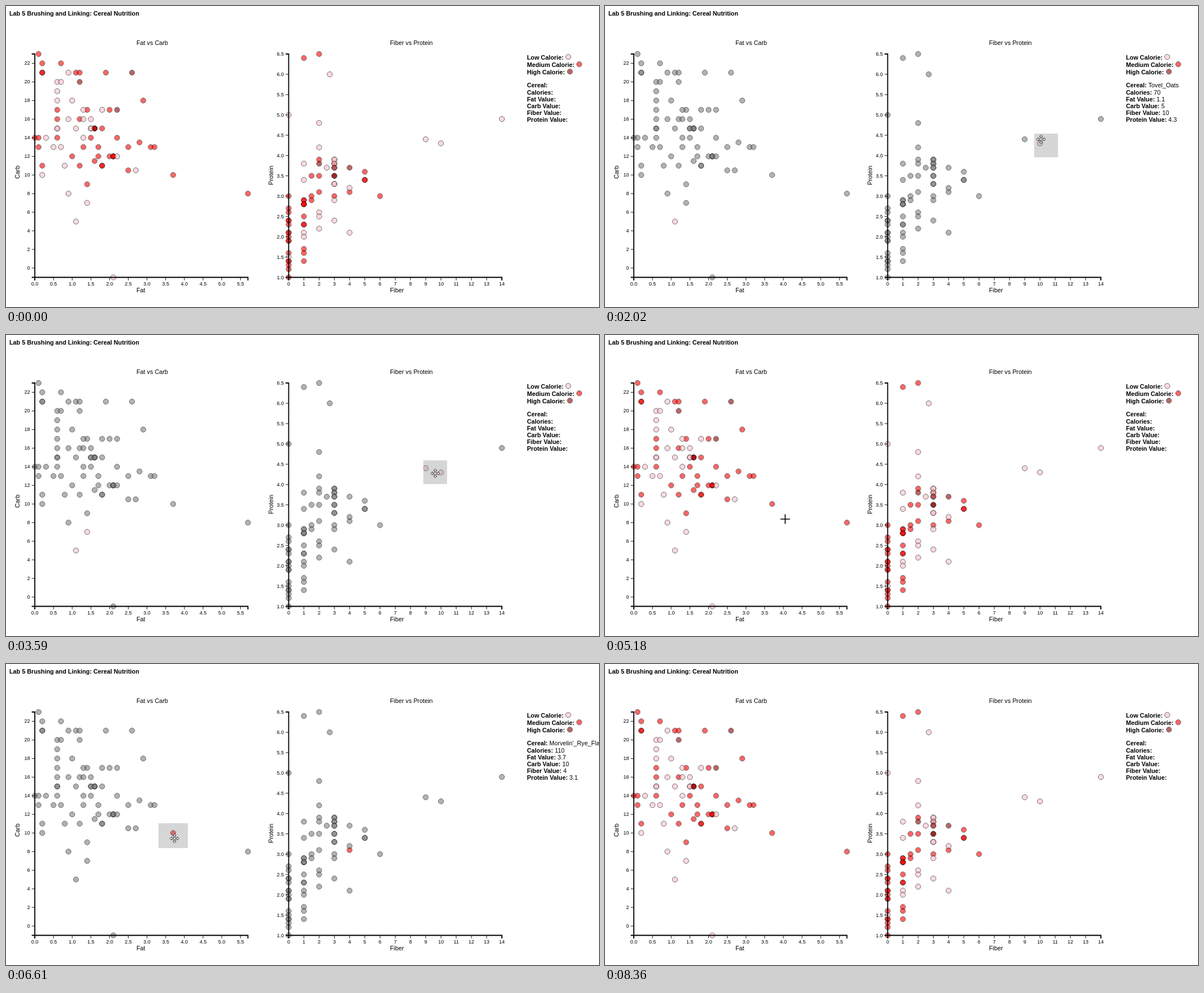
These frames come from a looping animation (1050x533 px, 8.88 s). An HTML page:

```html
<!DOCTYPE html>
<html>
<head>
<meta charset="utf-8">
<style>
html, body { margin: 0; width: 100%; height: 100%; overflow: hidden; background: #fff; }
svg { display: block; font: 10.8px "Liberation Sans", Arial, sans-serif; }
.b { font-weight: bold; }
.tick { font-size: 9px; }
.dot { opacity: .6; stroke: #000; stroke-width: .95; }
.axis { fill: none; stroke: #000; stroke-width: 1.8; }
.marks { fill: none; stroke: #000; stroke-width: .9; }
#brush { fill: #777; fill-opacity: .3; stroke: #fff; shape-rendering: crispEdges; }
</style>
</head>
<body>
<svg id="stage" width="1050" height="533" viewBox="0 0 1050 533"></svg>
<script>
const LOOP = 8880, TOP = 85, BOTTOM = 480.5;
const COLORS = { medium: 'red', low: 'pink', high: 'darkred' };

const plots = [
  { left: 51, right: 428.4, xMax: 5.7, yMin: -1, yMax: 23, xStep: .5, yFrom: 0, yStep: 2, xDigits: 1, yDigits: 0,
    title: 'Fat vs Carb', xName: 'Fat', yName: 'Carb', textX: 231, nameX: 23.5, nameY: 306 },
  { left: 500.5, right: 878, xMax: 14, yMin: 1, yMax: 6.5, xStep: 1, yFrom: 1, yStep: .5, xDigits: 0, yDigits: 1,
    title: 'Fiber vs Protein', xName: 'Fiber', yName: 'Protein', textX: 680, nameX: 473, nameY: 317 }
];

// Carb: fat values
const fatCarb = {
  medium: '23:.1 22:.2,.7 21:.2,.2,1.1,1.2,1.9 18:2.9 17:.6,1.4,2 16:.6,1.2 15:1.6,1.6,1.8 14:0,.1,.6,1.5,2.2 ' +
    '13.5:2.8 13:.1,1.3,1.7,2.5,3.1,3.2 12:1,1.7,2,2.1,2.1,2.1 11.5:1.6 11:.2,1.2,1.8,1.8 10.5:2.5 10:3.7 9:1.4 8:5.7',
  low: '21:.9 20:.6,.7 19:.6 18:.6,1 17:1.3,1.8 16:.9,1.3,1.5 15:.6,.6,1.1,1.5,1.5 14:.3,1.3 13:.5,.7 ' +
    '12:2.2 11:.8 10.5:2.7 10:.2 8:.9 7:1.4 5:1.1 -1:2.1',
  high: '21:2.6 20:1.2 17:2.2 15:1.6'
};
// Fiber: protein values
const fiberProtein = {
  medium: '0:3,2.7,2.6,2.4,2.4,2.3,2.1,2.1,2,1.9,1.9,1.6,1.4,1.4,1.3,1.2,1 ' +
    '1:6.4,2.9,2.9,2.8,2.8,2.8,2.5,2.3,2.3,1.7,1.6,1.4 1.5:3.5,3,2.9 2:6.5,3.9,3.5,3.1 3:3.8,3 4:3.1 5:3.6,3.4,3.4 6:3',
  low: '0:5,1.5 1:3.8,3.4,2.1,2 2:4.8,4.2,2.6,2.5,2.2 2.5:3.7 2.7:6 3:3.9,3.9,3.8,3.7,3.3,3.3,2.9,2.4 ' +
    '4:3.2,2.1 9:4.4 10:4.3 14:4.9',
  high: '2:3.8 3:3.7,3.5,3.5 4:3.7'
};
// fat, carb, fiber, protein of the cereals that get brushed
const links = [[1.1, 5, 10, 4.3], [1.4, 7, 9, 4.4], [3.7, 10, 4, 3.1], [2.7, 10.5, 2.5, 3.7], [2.5, 10.5, 2, 3.5]];

const labels = ['Cereal', 'Calories', 'Fat Value', 'Carb Value', 'Fiber Value', 'Protein Value'];
const details = [
  { from: 1880, to: 3590, values: ['Tovel_Oats', 70, 1.1, 5, 10, 4.3] },
  { from: 6050, to: 7550, values: ["Morvelin'_Rye_Flak", 110, 3.7, 10, 4, 3.1] }
];

// time, x, y
const path = [
  [110, 976, 522], [880, 800, 269], [1150, 802, 268], [1650, 759, 225], [2020, 772, 236], [2080, 772, 236],
  [2300, 785, 247], [2500, 781, 249], [2890, 781, 249], [3390, 760, 245], [3860, 760, 245], [4200, 700, 290],
  [4720, 520, 325], [5120, 319, 326], [5190, 319, 326], [5250, 323, 327], [5650, 270, 282], [5720, 270, 282],
  [6540, 298.5, 309], [6610, 298.5, 309], [7080, 245.5, 296], [7140, 245.5, 296], [7350, 228, 292],
  [7490, 228, 292], [7950, 306, 380], [8150, 306, 380], [8360, 839, 512]
];
const brushes = [
  { start: 1150, drawn: 1650, grab: 2890, drop: 3390, end: 4200 },
  { start: 5250, drawn: 5650, grab: 6610, drop: 7350, end: 7700 }
];

const px = (p, v) => p.left + v / p.xMax * (p.right - p.left);
const py = (p, v) => BOTTOM - (v - p.yMin) / (p.yMax - p.yMin) * (BOTTOM - TOP);
const text = (x, y, s, attrs = '') => `<text x="${x}" y="${y}" ${attrs}>${s}</text>`;
const circle = (x, y, color) => `<circle class="dot" cx="${x}" cy="${y}" r="4.6" fill="${color}"/>`;

function readDots(data, plot, keyIsX) {
  return Object.keys(data).flatMap(level => data[level].split(' ').flatMap(row => {
    const [key, list] = row.split(':');
    return list.split(',').map(v => {
      const [a, b] = keyIsX ? [+key, +v] : [+v, +key];
      return { a, b, x: px(plot, a), y: py(plot, b), color: COLORS[level] };
    });
  }));
}

function drawAxes(p) {
  let marks = '', out = '';
  for (let v = 0; v <= p.xMax; v += p.xStep) {
    const x = px(p, v);
    marks += `M${x} ${BOTTOM}v5.4`;
    out += text(x, 495, v.toFixed(p.xDigits), 'class="tick" text-anchor="middle"');
  }
  for (let v = p.yFrom; v <= p.yMax; v += p.yStep) {
    const y = py(p, v);
    marks += `M${p.left} ${y}h-5.4`;
    out += text(p.left - 8.5, y + 3, v.toFixed(p.yDigits), 'class="tick" text-anchor="end"');
  }
  return out + `<path class="marks" d="${marks}"/>` +
    `<path class="axis" d="M${p.left - 5.4} ${TOP}h5.4V${BOTTOM}h-5.4M${p.left} ${BOTTOM + 5.4}v-5.4H${p.right}v5.4"/>` +
    text(p.textX, 69, p.title) + text(p.textX, 507, p.xName) +
    text(0, 0, p.yName, `transform="translate(${p.nameX} ${p.nameY}) rotate(-90)"`);
}

const left = readDots(fatCarb, plots[0], false);
const right = readDots(fiberProtein, plots[1], true);
const dots = [...left, ...right];
for (const [fat, carb, fiber, protein] of links) {
  const l = left.find(d => d.a === fat && d.b === carb);
  const r = right.find(d => d.a === fiber && d.b === protein);
  l.mate = r;
  r.mate = l;
}

const stage = document.getElementById('stage');
stage.innerHTML =
  text(6, 17, 'Lab 5 Brushing and Linking: Cereal Nutrition', 'class="b"') +
  `<g id="dots">${dots.map(d => circle(d.x, d.y, d.color)).join('')}</g>` +
  plots.map(drawAxes).join('') +
  [['Low', 995.5, 'low'], ['Medium', 1015, 'medium'], ['High', 998.5, 'high']].map(([name, x, level], i) =>
    text(922.5, 95.3 + 13 * i, name + ' Calorie:', 'class="b"') + circle(x, 90.2 + 13 * i, COLORS[level])).join('') +
  labels.map((s, i) => text(922.5, 144.3 + 12.2 * i,
    `<tspan class="b">${s}:</tspan> <tspan class="value"></tspan>`)).join('') +
  '<rect id="brush"/><path id="cursor"/>';

const circles = document.getElementById('dots').children;
const values = stage.querySelectorAll('.value');
const brushBox = document.getElementById('brush');
const cursor = document.getElementById('cursor');
const setAttrs = (el, attrs) => { for (const k in attrs) el.setAttribute(k, attrs[k]); };

const shapes = {
  cross: { d: 'M-8.5 0H8.5M0-8.5V8.5', fill: 'none', stroke: '#000', 'stroke-width': 1.6 },
  move: { d: 'M0-8L3-5H1V-1H5V-3L8 0 5 3V1H1V5H3L0 8-3 5H-1V1H-5V3L-8 0-5-3V-1H-1V-5H-3Z',
    fill: '#fff', stroke: '#222', 'stroke-width': .9 },
  arrow: { d: 'M0 0V14.5L3.4 11.4 5.6 16.3 7.7 15.4 5.6 10.6H10Z', fill: '#fff', stroke: '#000', 'stroke-width': .9 }
};

function at(t) {
  let i = 1;
  while (i < path.length - 1 && path[i][0] < t) i++;
  const [t0, x0, y0] = path[i - 1], [t1, x1, y1] = path[i];
  const k = Math.min(1, Math.max(0, (t - t0) / (t1 - t0)));
  return [x0 + (x1 - x0) * k, y0 + (y1 - y0) * k];
}

function brushRect(b, t) {
  const [x1, y1] = at(b.start), [x0, y0] = at(Math.min(t, b.drawn));
  const [gx, gy] = at(b.grab), [dx, dy] = at(Math.min(Math.max(t, b.grab), b.drop));
  return { x: x0 + dx - gx, y: y0 + dy - gy, w: x1 - x0, h: y1 - y0 };
}

const inside = (r, x, y) => x > r.x && x < r.x + r.w && y > r.y && y < r.y + r.h;

function cursorShape(x, y, rect, drawing) {
  if (drawing) return 'cross';
  if (rect && inside(rect, x, y)) return 'move';
  const overPlot = plots.some(p => x >= p.left && x <= p.right && y >= TOP && y <= BOTTOM);
  return overPlot ? 'cross' : 'arrow';
}

function render(t) {
  const b = brushes.find(b => t > b.start && t < b.end);
  const rect = b && brushRect(b, t);
  dots.forEach((d, i) => {
    const lit = !rect || inside(rect, d.x, d.y) || (d.mate && inside(rect, d.mate.x, d.mate.y));
    circles[i].setAttribute('fill', lit ? d.color : 'gray');
  });
  brushBox.style.display = rect ? '' : 'none';
  if (rect) setAttrs(brushBox, { x: rect.x, y: rect.y, width: rect.w, height: rect.h });

  const info = details.find(d => t >= d.from && t < d.to);
  values.forEach((el, i) => { el.textContent = info ? info.values[i] : ''; });

  cursor.style.display = t >= 110 && t < 8360 ? '' : 'none';
  const [x, y] = at(t);
  setAttrs(cursor, { ...shapes[cursorShape(x, y, rect, b && t < b.drawn)], transform: `translate(${x} ${y})` });
}

function tick() {
  render(performance.now() % LOOP);
  requestAnimationFrame(tick);
}
tick();
</script>
</body>
</html>
```
